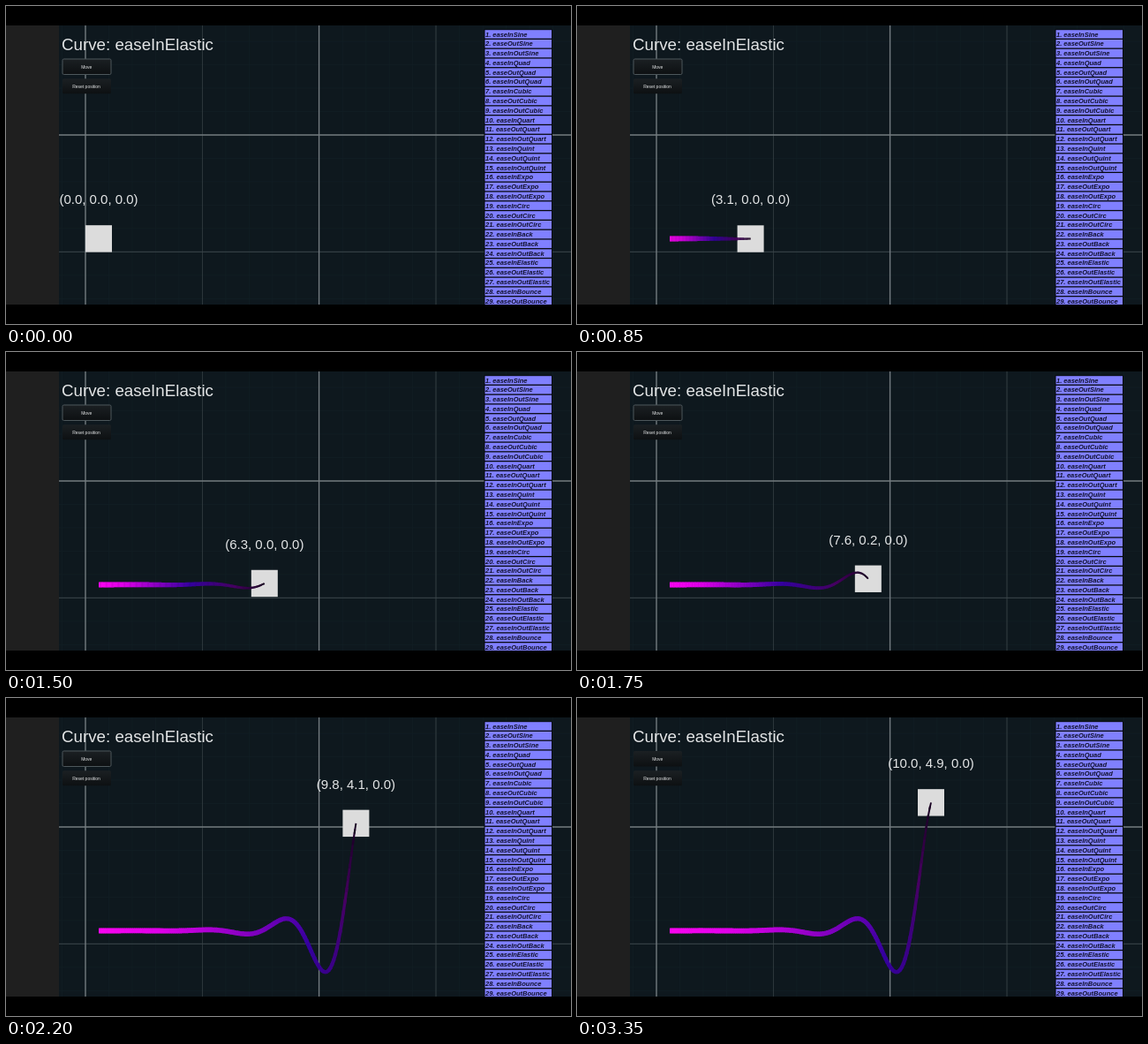
Recreate the animation shown at these times as an HTML page. Size 640 px wide and 360 px high, loop 3400 ms.

```html
<!DOCTYPE html>
<html lang="en">
<head>
<meta charset="utf-8">
<title>easeInElastic</title>
<style>
  html, body { margin: 0; width: 100%; height: 100%; overflow: hidden; background: #000; }
  svg { display: block; width: 100vw; height: 100vh; }
  text { font-family: "Liberation Sans", Arial, sans-serif; fill: #e4e6e7; }
  .mid { text-anchor: middle; }
  .btn { font-size: 5px; }
  .item { font-size: 7.5px; font-weight: bold; font-style: italic; fill: #10102c; }
</style>
</head>
<body>
<svg id="stage" viewBox="0 0 640 360">
  <defs>
    <linearGradient id="face" x2="0" y2="1">
      <stop stop-color="#1b2023"/>
      <stop offset="1" stop-color="#0d1012"/>
    </linearGradient>
    <clipPath id="view"><rect y="22" width="640" height="316"/></clipPath>
  </defs>
  <rect width="640" height="360"/>
  <g clip-path="url(#view)">
    <rect x="60" y="22" width="580" height="316" fill="#0e181e"/>
    <g id="grid"></g>
    <rect y="22" width="60" height="316" fill="#1f1f1f"/>
    <rect id="box" width="30" height="30.4" fill="#dcdcdc"/>
    <g id="trail"></g>
    <text id="label" class="mid" font-size="15"></text>
    <text x="63" y="50" font-size="18.75">Curve: easeInElastic</text>
    <rect id="move" x="64" y="60" width="55" height="17.5" rx="1.5" fill="url(#face)"/>
    <text class="btn mid" x="91.3" y="70.6">Move</text>
    <rect x="64" y="82.3" width="55" height="17" rx="1.5" fill="url(#face)"/>
    <text class="btn mid" x="91" y="92.7">Reset position</text>
    <g id="list"></g>
  </g>
</svg>
<script>
const LOOP = 3400, STEP = 50, START = 231, RUN = 2000, RELEASE = 3350;
const ORIGIN = { x: 105, y: 263.4 }, UNIT = 29.6, RANGE = { x: 10, y: 4.9 };
const SEGMENTS = 160;
const COLORS = [
  [0, [250, 5, 240]],
  [0.15, [222, 0, 232]],
  [0.55, [52, 0, 158]],
  [0.82, [70, 0, 96]],
  [1, [22, 0, 30]]
];

const $ = id => document.getElementById(id);

function add(parent, tag, attrs, text) {
  const el = document.createElementNS("http://www.w3.org/2000/svg", tag);
  set(el, attrs);
  if (text) el.textContent = text;
  parent.appendChild(el);
  return el;
}

function set(el, attrs) {
  for (const key in attrs) el.setAttribute(key, attrs[key]);
}

function buildGrid() {
  const vline = (x, stroke, w) =>
    add($("grid"), "line", { x1: x, x2: x, y1: 22, y2: 338, stroke, "stroke-width": w });
  const hline = (y, stroke, w) =>
    add($("grid"), "line", { x1: 60, x2: 640, y1: y, y2: y, stroke, "stroke-width": w });
  for (let i = -1; i < 21; i++) vline(90 + i * 26.48, "#111d23", 1);
  for (let i = -4; i < 8; i++) hline(146 + i * 26.48, "#111d23", 1);
  vline(222.5, "#2c363b", 1);
  vline(487, "#343e43", 1);
  hline(278.3, "#3c464b", 1);
  vline(90, "#737b7f", 1.4);
  vline(354.6, "#737b7f", 1.4);
  hline(146, "#737b7f", 1.5);
}

function buildList() {
  const families = ["Sine", "Quad", "Cubic", "Quart", "Quint", "Expo", "Circ", "Back", "Elastic", "Bounce"];
  const names = families.flatMap(f => ["In", "Out", "InOut"].map(d => "ease" + d + f));
  add($("list"), "rect", { x: 541.5, y: 26.5, width: 77.5, height: 312, fill: "#05070c" });
  names.slice(0, 29).forEach((name, i) => {
    const y = 27.2 + i * 10.79;
    add($("list"), "rect", { x: 542.5, y, width: 75.5, height: 9.5, fill: "#8080ff" });
    add($("list"), "text", { x: 543, y: y + 7.3, class: "item" }, `${i + 1}. ${name}`);
  });
}

// Elastic ease-in whose amplitude also grows with t.
function elastic(t) {
  const u = 10 * t - 10;
  return -t * 2 ** u * Math.sin((u - 0.75) * 2 * Math.PI / 3);
}

function position(t) {
  const x = RANGE.x * t, y = RANGE.y * elastic(t);
  return { x, y, px: ORIGIN.x + x * UNIT, py: ORIGIN.y - y * UNIT };
}

function trailColor(s) {
  const i = Math.max(1, COLORS.findIndex(c => s <= c[0]));
  const [a, from] = COLORS[i - 1], [b, to] = COLORS[i];
  const k = (s - a) / (b - a);
  return `rgb(${from.map((v, j) => Math.round(v + (to[j] - v) * k))})`;
}

function drawTrail(t) {
  $("trail").style.display = t > 0 ? "" : "none";
  if (t <= 0) return;
  const pts = [], lengths = [0];
  for (let i = 0; i <= SEGMENTS; i++) {
    pts.push(position(t * i / SEGMENTS));
    if (i) lengths.push(lengths[i - 1] + Math.hypot(pts[i].px - pts[i - 1].px, pts[i].py - pts[i - 1].py));
  }
  const total = lengths[SEGMENTS];
  segments.forEach((seg, i) => {
    const a = pts[i], b = pts[i + 1];
    const s = (lengths[i] + lengths[i + 1]) / 2 / total;
    const over = i < SEGMENTS - 1 ? 0.4 : 0;
    set(seg, {
      x1: a.px, y1: a.py,
      x2: b.px + (b.px - a.px) * over, y2: b.py + (b.py - a.py) * over,
      stroke: trailColor(s), "stroke-width": 6 - 4.2 * s * s
    });
  });
}

function number(v) {
  return v.toFixed(1).replace(/^-0\.0$/, "0.0");
}

function render(time) {
  const now = Math.floor((time % LOOP) / STEP) * STEP;
  const t = Math.min(1, Math.max(0, (now - START) / RUN));
  const p = position(t);
  set($("box"), { x: p.px - 15, y: p.py - 15.2 });
  set($("label"), { x: p.px, y: p.py - 39.2 });
  $("label").textContent = `(${number(p.x)}, ${number(p.y)}, 0.0)`;
  drawTrail(t);
  set($("move"), { stroke: now < RELEASE ? "#4d575b" : "none" });
}

buildGrid();
buildList();
const segments = Array.from({ length: SEGMENTS }, () => add($("trail"), "line", {}));
const begin = performance.now();
(function tick() {
  render(performance.now() - begin);
  requestAnimationFrame(tick);
})();
</script>
</body>
</html>
```
